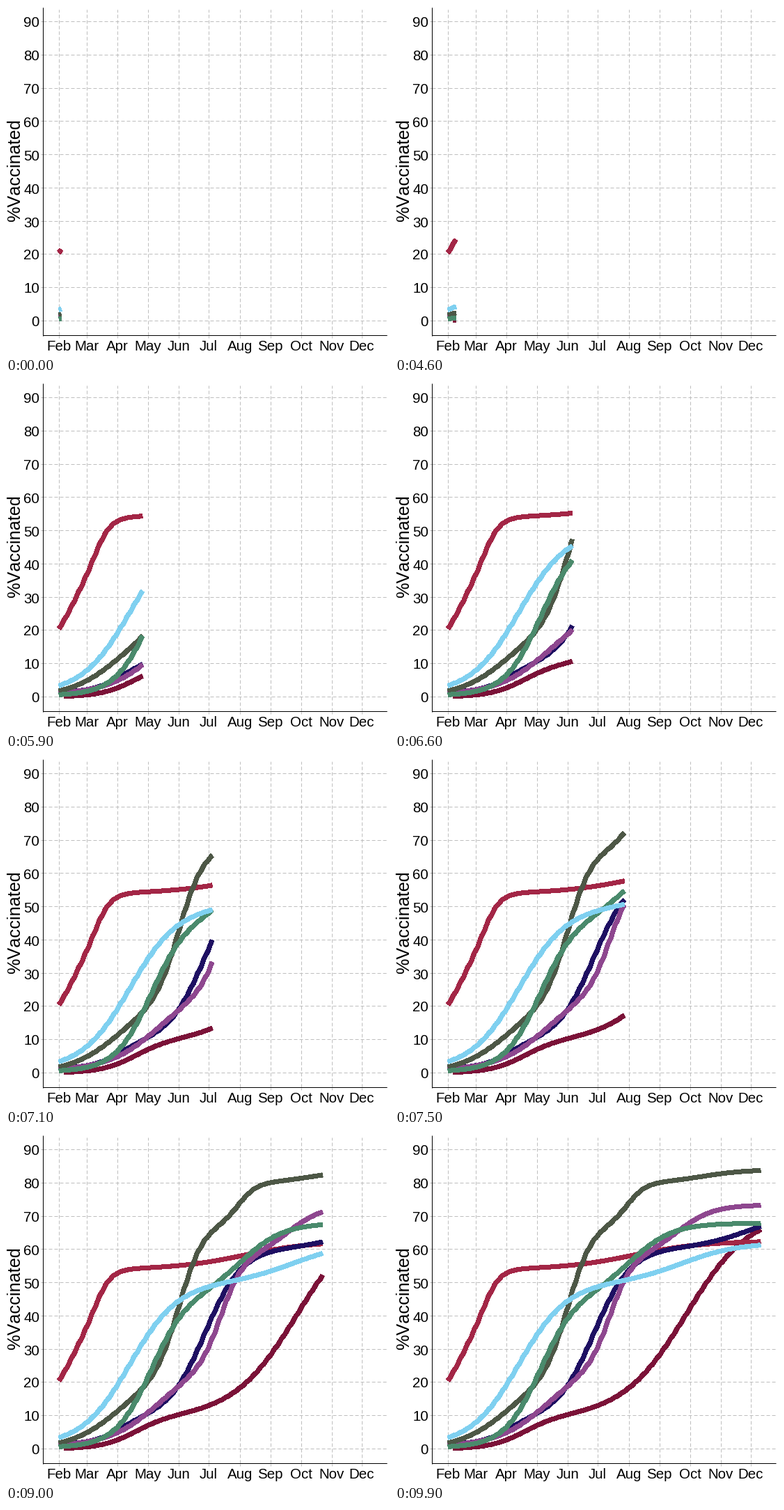
These frames come from a looping animation (550 px wide and 500 px high, 10000 ms). A matplotlib script:

```python
import numpy as np
import matplotlib.pyplot as plt
from matplotlib.animation import FuncAnimation

W, H, DPI = 550, 500, 100
PX = 72 / DPI             # one pixel in points
FRAMES, STEP = 100, 100
HOLD = 45                 # last frame of the opening pause
X0, DAY = 76.02, 1.438    # pixel of 1 February, pixels per day
Y0, PCT = 452.5, 4.778    # pixel of 0 %, pixels per percent
X_END = 525

plt.rcParams["font.family"] = "Liberation Sans"
plt.rcParams["text.kerning_factor"] = 6   # practically no kerning

# Back to front: colour, first day, base percent, then the growth waves,
# each as (percent gained, middle day, spread in days).
SERIES = [
    ("#7b1238", 5, 0, [(9.5, 76, 17), (62, 238, 32)]),
    ("#a32646", 0, 15, [(20, 10, 10), (19, 37, 8), (8.5, 185, 35)]),
    ("#1e0f62", 0, 1.4, [(8, 60, 14), (51, 146, 18.5), (10.5, 300, 25)]),
    ("#8e478f", 0, 0.9, [(24, 97, 24), (33, 162, 11), (15.5, 230, 18)]),
    ("#4d5746", 0, 0, [(22, 58, 24), (46, 120.5, 12), (12, 180, 9),
                       (4, 255, 22)]),
    ("#4a8a6c", 0, 0.4, [(46, 92, 18), (21.5, 184, 21)]),
    ("#7fd0f0", 0, 1, [(49, 71, 24), (12, 235, 28)]),
]


def percent(day, base, waves):
    """Sum of logistic waves, growing more slowly around weekends."""
    t = day - 0.35 * np.sin(2 * np.pi * day / 7)
    return base + sum(gain / (1 + np.exp((mid - t) / spread))
                      for gain, mid, spread in waves)


def tip(frame):
    """Pixel that the lines have reached."""
    return min(79.2 + 8.34 * max(frame - HOLD, 0), X_END)


fig = plt.figure(figsize=(W / DPI, H / DPI), dpi=DPI, facecolor="white")
ax = fig.add_axes([0, 0, 1, 1])
ax.set_xlim(0, W)
ax.set_ylim(H, 0)
ax.axis("off")


def rule(xs, ys, color, style="-"):
    ax.plot(xs, ys, color=color, lw=PX, ls=style, solid_capstyle="butt",
            dash_capstyle="butt", zorder=1)


def label(x, y, text, size, **kw):
    ax.text(x, y, text, size=size * PX, va="baseline",
            rotation_mode="anchor", **kw)


GREY, DASH = "#bebebe", (0, (5, 3))
MONTHS = "Feb Mar Apr May Jun Jul Aug Sep Oct Nov Dec".split()
first_days = np.arange("2021-02", "2022-01", dtype="datetime64[M]")
first_days = first_days.astype("datetime64[D]").astype(int)
for name, day in zip(MONTHS, first_days - first_days[0]):
    x = int(X0 + day * DAY)
    rule([x, x], [473, 5], GREY, DASH)
    rule([x, x], [474, 477], GREY)
    label(x - 0.3, 495, name, 20.5, ha="center")
for value in range(0, 100, 10):
    y = int(Y0 - value * PCT)
    rule([53, 546], [y, y], GREY, DASH)
    rule([50, 53], [y, y], GREY)
    label(48, y + 8.5, str(value), 20.5, ha="right")
rule([53, 53], [2, 474], "black")
rule([53, 547], [473, 473], "black")
label(20, 236.5, "%Vaccinated", 25.2, ha="center", rotation=90)

lines = [ax.plot([], [], color=s[0], lw=6 * PX, solid_capstyle="butt",
                 solid_joinstyle="round", antialiased=False, zorder=2 + i)[0]
         for i, s in enumerate(SERIES)]


def draw(frame):
    last = (tip(frame) - X0) / DAY
    for line, (_, first, base, waves) in zip(lines, SERIES):
        if last > first:
            day = np.linspace(first, last, int(last - first) + 3)
            line.set_data(X0 + DAY * day, Y0 - PCT * percent(day, base, waves))
        else:
            line.set_data([], [])
    return lines


anim = FuncAnimation(fig, draw, frames=FRAMES, interval=STEP,
                     repeat=True, repeat_delay=0)
plt.show()
```
